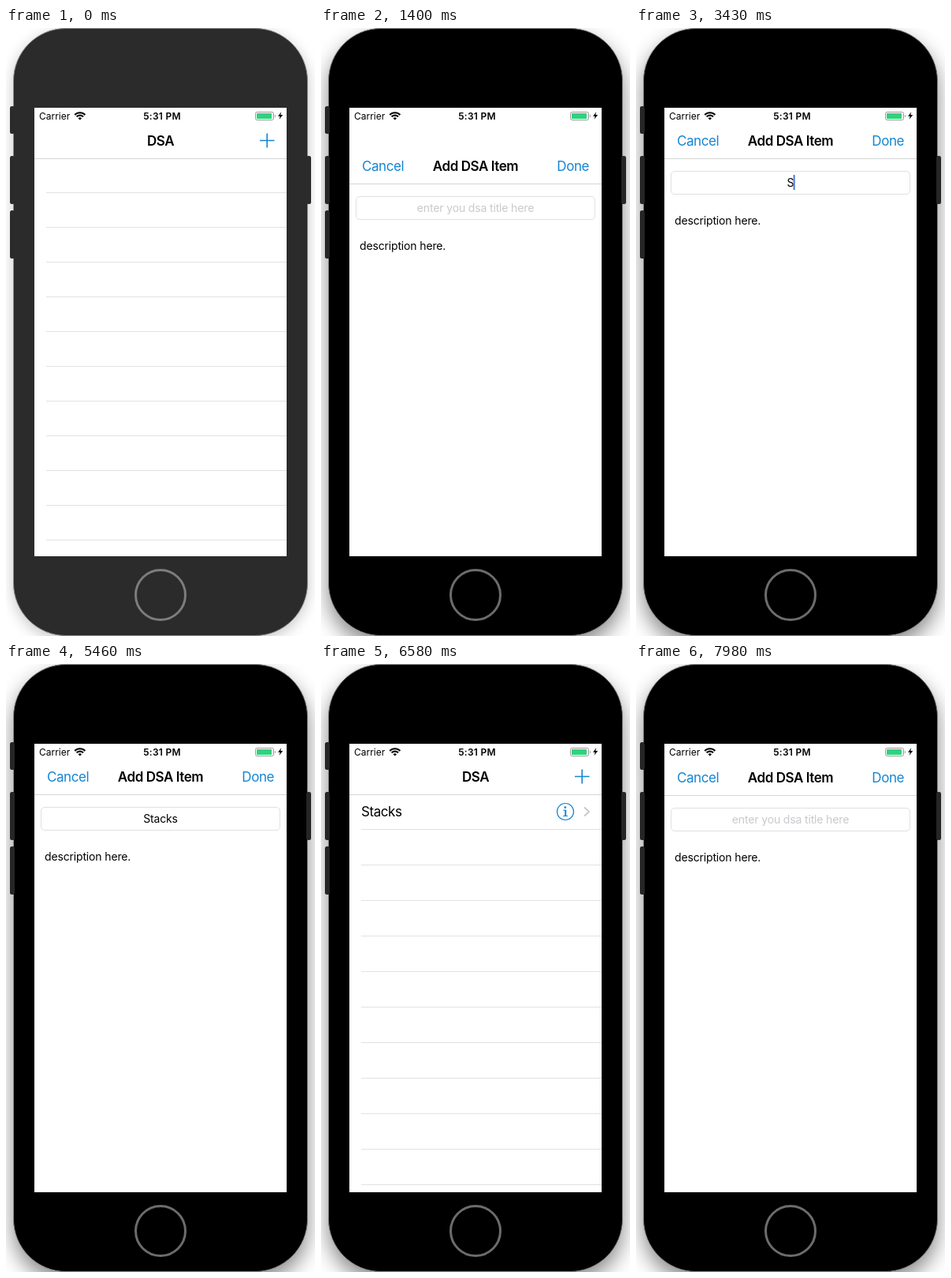
Recreate the animation shown at these times as an HTML page. Size 392 px wide and 770 px high, loop 8 s.

```html
<!DOCTYPE html>
<html lang="en">
<head>
<meta charset="utf-8">
<title>DSA list</title>
<style>
html, body { margin: 0; width: 100%; height: 100%; overflow: hidden; background: #fff; }
#phone { position: absolute; left: 9px; top: 0; width: 372px; height: 768px; border: 1px solid #8a8a8a;
  border-radius: 67px; background: #2b2b2b; box-shadow: 0 5px 18px rgba(0,0,0,.22); }
#phone.active { background: #000; box-shadow: 0 12px 26px rgba(0,0,0,.46); }
svg { position: absolute; left: 0; top: 0; }
text { font: 17px Inter, Roboto, sans-serif; letter-spacing: -.43px; white-space: pre; }
.bold { font-weight: 600; }
.small { font-size: 14px; letter-spacing: -.15px; }
.bar { font-size: 12px; letter-spacing: 0; }
.time { letter-spacing: .25px; }
.mid { text-anchor: middle; }
.blue { fill: #1485d2; }
.line { fill: none; stroke: #1485d2; }
</style>
</head>
<body>
<div id="phone"></div>
<svg width="392" height="770" viewBox="0 0 392 770">
  <g id="keys" fill="#2b2b2b">
    <rect x="5" y="99" width="6" height="35" rx="2.5"/>
    <rect x="5" y="162" width="6" height="61" rx="2.5"/>
    <rect x="5" y="231" width="6" height="61" rx="2.5"/>
    <rect x="381" y="162" width="6" height="61" rx="2.5"/>
  </g>
  <circle id="home" cx="196" cy="718" r="31.5" fill="none" stroke="#7d7d7d" stroke-width="3"/>
  <clipPath id="screen"><rect x="36" y="101" width="320" height="568"/></clipPath>
  <g clip-path="url(#screen)">
    <rect x="36" y="101" width="320" height="568" fill="#fff"/>
    <path id="rows" stroke="#e2e2e4"/>
    <path d="M36 165.5H356" stroke="#d6d6d6"/>
    <text class="bold mid" x="196" y="149">DSA</text>
    <path id="plus" class="line" stroke-width="1.6" d="M322 142.5H340.5M331.2 133.5V151.5"/>
    <g id="item">
      <text x="51" y="193">Stacks</text>
      <circle class="line" cx="310" cy="187" r="10.5" stroke-width="1.2"/>
      <circle class="blue" cx="309.8" cy="181.7" r="1.4"/>
      <path class="line" stroke-width="1.1" d="M307.3 185.2H310M307 192.5H313"/>
      <path class="line" stroke-width="2" d="M310.2 184.7V192.5"/>
      <path d="M334 181.5L340 187L334 192.5" fill="none" stroke="#c7c7cc" stroke-width="1.8"/>
    </g>
    <g id="modal">
      <rect x="36" y="101" width="320" height="568" fill="#fff"/>
      <path d="M36 165.5H356" stroke="#d6d6d6"/>
      <text class="blue" x="52" y="149">Cancel</text>
      <text class="bold mid" x="196" y="149">Add DSA Item</text>
      <text id="done" class="blue" x="340" y="149" text-anchor="end">Done</text>
      <rect x="44.5" y="181.5" width="303" height="29" rx="4.5" fill="#fff" stroke="#e0e0e0"/>
      <text id="hint" class="small mid" x="196" y="201" fill="#c9c9ce">enter you dsa title here</text>
      <text id="entry" class="small mid" x="196" y="201"></text>
      <rect id="caret" y="186" width="2" height="19" fill="#4f73dc"/>
      <text class="small" x="49" y="249">description here.</text>
    </g>
    <text class="bar" x="42" y="116">Carrier</text>
    <g fill="none" stroke="#000" stroke-width="2.1">
      <path d="M87.2 110.1A9.2 9.2 0 0 1 100.4 110.1M89.6 112.4A5.8 5.8 0 0 1 98 112.4"/>
      <path d="M93.8 116.6L91.5 114.3A3.3 3.3 0 0 1 96.1 114.3Z" fill="#000" stroke="none"/>
    </g>
    <text class="bar bold time mid" x="198" y="116">5:31 PM</text>
    <rect x="316.5" y="106.5" width="23" height="10" rx="2" fill="none" stroke="#999"/>
    <rect x="318" y="108" width="19" height="7" rx=".5" fill="#2fd27f"/>
    <path d="M341 109.5Q343 111.5 341 113.5Z" fill="#999"/>
    <path d="M349.3 106.3L345 111.8H347.7L346.6 115.7L351.2 110.1H348.3Z"/>
  </g>
</svg>
<script>
const LOOP = 8000, HEIGHT = 568;
const $ = id => document.getElementById(id);
const set = (id, name, value) => $(id).setAttribute(name, value);
const ramp = (t, from, to) => Math.min(1, Math.max(0, (t - from) / (to - from)));

// Remaining share of a critically damped spring
function spring(t, start) {
  const u = Math.max(0, t - start) * .01826;
  return (1 + u) * Math.exp(-u);
}

function modalOffset(t) {
  const share = t < 5975 ? spring(t, 1150)
    : t < 7400 ? 1 - spring(t, 5975)
    : spring(t, 7490);
  // A last sliver stays until the sheet is removed
  const limit = t > 5975 && t < 6580 ? HEIGHT - 1 : HEIGHT;
  return Math.min(limit, Math.round(share * HEIGHT));
}

const press = (t, down, up) => 1 - .8 * ramp(t, down - 30, down + 30) * (1 - ramp(t, up, up + 250));

function caretOpacity(t) {
  if (t < 2450 || t >= 6020) return 0;
  return 1 - ramp(t, 2750, 2940) + ramp(t, 3110, 3290) - ramp(t, 5200, 5450) + ramp(t, 5710, 5860);
}

const keyTimes = [3360, 3780, 3990, 4200, 4410, 4620];

function rowPath(first, step) {
  let d = "";
  for (let i = 0; i < 11; i++) d += `M51 ${first + i * step + .5}H356`;
  return d;
}

function draw(t) {
  const active = t >= 1050, saved = t >= 5975;
  $("phone").className = active ? "active" : "";
  set("keys", "fill", active ? "#262626" : "#2b2b2b");
  set("home", "stroke", active ? "#6c6c6c" : "#7d7d7d");

  set("rows", "d", saved ? rowPath(209, 45) : rowPath(208, 44));
  set("item", "opacity", saved ? 1 : 0);
  set("plus", "opacity", Math.min(press(t, 1100, 1160), press(t, 7350, 7480)));
  set("done", "opacity", press(t, 5850, 5960));
  set("modal", "transform", `translate(0 ${modalOffset(t)})`);

  const word = t < 7000 ? "Stacks".slice(0, keyTimes.filter(k => t >= k).length) : "";
  $("entry").textContent = word;
  set("hint", "opacity", word ? 0 : 1);
  set("caret", "x", word ? 195.2 + $("entry").getComputedTextLength() / 2 : 120);
  set("caret", "opacity", caretOpacity(t));
}

const begin = performance.now();
function frame() {
  draw((performance.now() - begin) % LOOP);
  requestAnimationFrame(frame);
}
frame();
</script>
</body>
</html>
```
